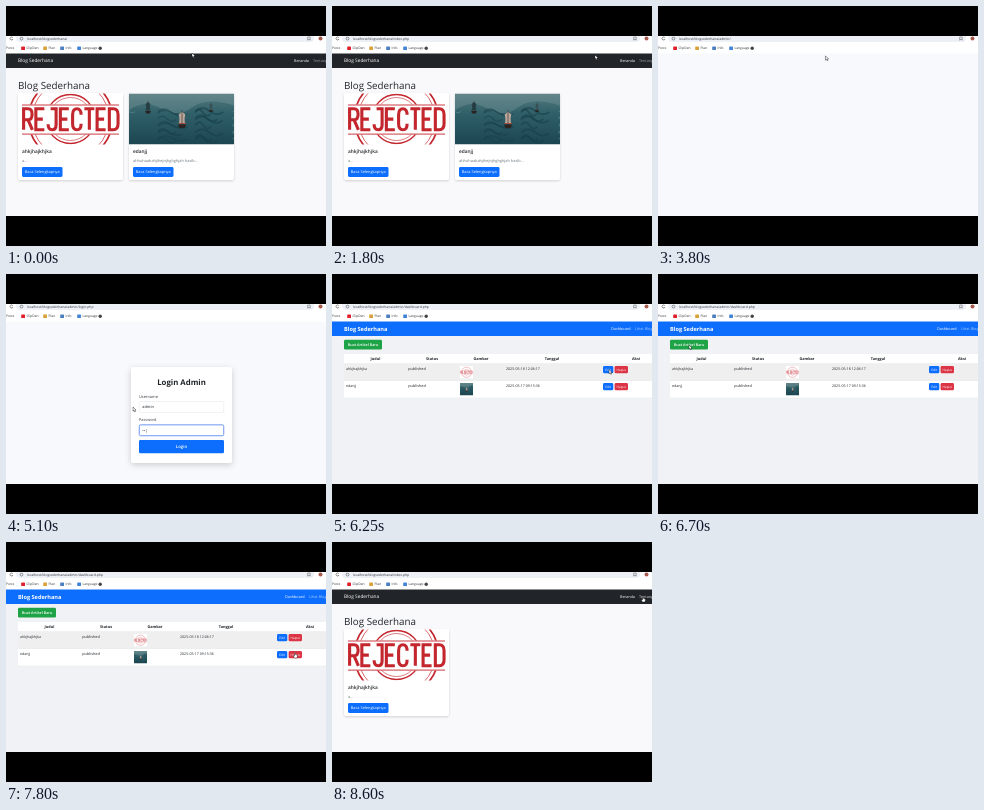
Write an HTML page that moves like this. It is 320 by 240 pixels and loops after 8650 ms.

```html
<!DOCTYPE html>
<html lang="id">
<head>
<meta charset="utf-8">
<title>Blog Sederhana</title>
<style>
html, body { margin: 0; width: 100%; height: 100%; overflow: hidden; background: #000; }
svg#stage { display: block; width: 100vw; height: 100vh; }
text { font-family: "Open Sans", "Noto Sans", sans-serif; text-rendering: geometricPrecision; white-space: pre; }
</style>
</head>
<body>
<svg id="stage" viewBox="0 0 320 240"></svg>
<script>
const LOOP = 8650;
const BLUE = '#0d6efd', DARK = '#212529', RED = '#c4262e';
const HOST = 'localhost/blogsederhana/';
const stage = document.getElementById('stage');

// y is the middle of the lower-case letters
const text = (x, y, s, size, fill = DARK, weight = 400, anchor = 'start', id = '') =>
  `<text ${id && `id="${id}"`} x="${x}" y="${y + size * 0.31}" font-size="${size}" fill="${fill}" font-weight="${weight}" text-anchor="${anchor}">${s}</text>`;
const rect = (x, y, w, h, fill, r = 0, more = '') =>
  `<rect x="${x}" y="${y}" width="${w}" height="${h}" rx="${r}" fill="${fill}" ${more}/>`;
const line = (d, stroke, width, more = '') =>
  `<path d="${d}" fill="none" stroke="${stroke}" stroke-width="${width}" ${more}/>`;
const group = (id, body, more = '') => `<g id="${id}" ${more}>${body}</g>`;
const place = (x, y, k = 1) => `matrix(${k} 0 0 ${k} ${x} ${y})`;
const button = (x, y, w, h, s, fill, size = 3.7, weight = 400) =>
  rect(x, y, w, h, fill, 1.4) + text(x + w / 2, y + h / 2, s, size, '#fff', weight, 'middle');
const field = (x, y, w, h, id = '') =>
  rect(x + .25, y + .25, w - .5, h - .5, '#fff', 1.4, `stroke="#dee2e6" stroke-width=".5" ${id && `id="${id}"`}`);
const picture = (id, x, y, w, h) => `<use href="#${id}" x="${x}" y="${y}" width="${w}" height="${h}"/>`;

function stamp() {
  const glyphs = {
    R: 'M0 21V0H4.5Q8.5 0 8.5 5.5T4.5 11H0M4.5 11L8.8 21',
    E: 'M8.5 0H0V21H8.5M0 10.3H7',
    J: 'M2.5 0H8V16Q8 21 4 21T0 15.5',
    C: 'M8.5 6Q8.5 0 4.3 0T0 6V15Q0 21 4.3 21T8.5 15',
    T: 'M-.5 0H9.5M4.5 0V21',
    D: 'M0 0H4Q8.7 0 8.7 6V15Q8.7 21 4 21H0Z'
  };
  const ring = (r, w) => `<circle cx="52.5" cy="52.5" r="${r}" fill="none" stroke="${RED}" stroke-width="${w}"/>`;
  const word = [...'REJECTED'].map((c, i) =>
    `<path transform="${place(5.6 + i * 12.25, 42.3)}" d="${glyphs[c]}"/>`).join('');
  return rect(0, 0, 105, 105, '#fff') + ring(42, 1.7) + ring(38.5, .7) + ring(24.5, 1.3) + ring(21.5, .6) +
    rect(0, 38, 105, 30, '#fff') + line('M4 38.5H101M4 67.6H101', RED, .9) +
    `<g fill="none" stroke="${RED}" stroke-width="3.1">${word}</g>`;
}

function sea() {
  let waves = '';
  for (let i = 0; i < 26; i++) {
    const x = (i * 37.3) % 112 - 8, y = 17 + (i * 13.7) % 34, w = 7 + (i * 5) % 9;
    waves += line(`M${x} ${y}q${w / 2} ${-4 - i % 3} ${w} 0t${w} 1`, i % 3 ? '#173f49' : '#6d9698', 1 + i % 3 * .4, 'opacity=".55"');
  }
  const ship = (x, y, k, sail) => `<g transform="${place(x, y, k)}">` +
    `<path d="M-5 6H5L3 10H-3Z" fill="#2b2322"/><path d="M-4 5Q-2 0-4-6L0-9 4-6Q2 0 4 5Z" fill="${sail}"/>` +
    line('M0-11V6', '#2d2524', .7) + '</g>';
  return rect(0, 0, 105, 51, 'url(#water)') +
    '<path d="M0 17Q15 5 32 15T63 14T105 12V0H0Z" fill="#7e9ea0" opacity=".35"/>' + waves +
    ship(19, 14, .6, '#26434a') + ship(53, 26, .85, '#b9a79b') + ship(82, 14, .45, '#3a5a60') +
    line('M50 30H57', '#a4493d', 1.2);
}

const defs = `<defs>
<linearGradient id="water" x2="0" y2="1"><stop stop-color="#55797d"/><stop offset=".4" stop-color="#2f5f68"/><stop offset="1" stop-color="#1c4651"/></linearGradient>
<filter id="soft" x="-20%" y="-20%" width="140%" height="140%"><feDropShadow dx="0" dy="1" stdDeviation="1.3" flood-opacity=".16"/></filter>
<filter id="deep" x="-20%" y="-20%" width="140%" height="140%"><feDropShadow dx="0" dy="2" stdDeviation="3" flood-opacity=".18"/></filter>
<clipPath id="screen"><rect y="30" width="320" height="180"/></clipPath>
<symbol id="stampPic" viewBox="0 0 105 105" preserveAspectRatio="xMidYMid slice">${stamp()}</symbol>
<symbol id="seaPic" viewBox="0 0 105 51" preserveAspectRatio="xMidYMid slice">${sea()}</symbol></defs>`;

function toolbar() {
  const marks = [[0, 'Posts', ''], [20.5, 'ClipDen', '#e0202b'], [42.5, 'Plan', '#d8a13a'],
    [59.5, 'Info', '#4c7fc0'], [76.5, 'Language', '#4285d8']];
  return rect(0, 30, 320, 17.5, '#fff') + rect(10, 26, 298, 10, '#edf0f7', 4) +
    line('M6.8 31.6A1.5 1.5 0 1 0 7 33', '#444', .6) +
    `<circle cx="15.5" cy="32.6" r="1.4" fill="none" stroke="#555" stroke-width=".6"/>` +
    text(21, 32.6, '', 3.4, '#333', 400, 'start', 'url') +
    line('M301.7 31V34.2L303 33.2 304.2 34.2V31Z', '#555', .5) +
    '<circle cx="314.5" cy="32.6" r="2" fill="#a75a4d"/>' +
    marks.map(([x, s, c]) => (c ? rect(x - 5.3, 40.4, 3.8, 3.6, c, .6) : '') + text(x, 42.2, s, 3.3, '#333')).join('') +
    '<circle cx="94.2" cy="42.2" r="1.7" fill="#444"/>';
}

const card = (x, pic, title, body) =>
  rect(x, 87, 105, 87, '#fff', 2, 'filter="url(#soft)"') + picture(pic, x, 87.5, 105, 51) +
  text(x + 4, 146, title, 4.8, DARK, 600) + text(x + 4, 154.3, body, 3.9, '#6c757d') +
  button(x + 4, 161, 40.5, 10, 'Baca Selengkapnya', BLUE, 3.9);

const home = rect(0, 47, 320, 163, '#f9f9fb') + rect(0, 47, 320, 15, DARK) +
  text(12, 54.8, 'Blog Sederhana', 4.8, '#fff') + text(288, 54.8, 'Beranda', 3.8, '#fff') +
  text(307, 54.8, 'Tentang', 3.8, '#999c9f', 400, 'start', 'about') +
  text(12, 80.4, 'Blog Sederhana', 9.8, DARK, 500) +
  card(12, 'stampPic', 'ahkjhajkhjka', 'a...') +
  group('second', card(123, 'seaPic', 'edanjj', 'ahhuhaahahjihejnjhghghjah hasib...'));

const login = group('loginCard', rect(125, 93, 101, 96, '#fff', 3, 'filter="url(#deep)"') +
  text(175.5, 108.3, 'Login Admin', 7.8, DARK, 700, 'middle') +
  text(133, 122.4, 'Username', 3.9, '#343a40') + field(133, 127.3, 85, 11.4, 'userBox') +
  text(136.3, 133, '', 3.9, DARK, 400, 'start', 'user') +
  text(133, 146, 'Password', 3.9, '#343a40') + field(133, 150.6, 85, 11.4, 'passBox') +
  text(136.3, 156.3, '', 3.9, DARK, 400, 'start', 'pass') +
  button(133, 166, 85, 13.3, 'Login', BLUE, 4.3, 600));

const row = (y, title, pic, date, fill) =>
  rect(12, y, 308, 17, fill) + line(`M12 ${y + 17}H320`, '#dee2e6', .4) +
  text(14, y + 5.2, title, 3.6) + text(76.3, y + 5.2, 'published', 3.8) +
  picture(pic, 128, y + 2, 13, 12.5) + text(174, y + 5.2, date, 3.6) +
  button(271, y + 2, 10.3, 7.3, 'Edit', BLUE, 3.2) + button(282.6, y + 2, 13.4, 7.3, 'Hapus', '#dc3545', 3.2);

const dashboard = rect(0, 47, 320, 163, '#f0f2f5') + rect(0, 47, 320, 15, BLUE) +
  text(12, 54.8, 'Blog Sederhana', 5.6, '#fff', 700) + text(279, 54.8, 'Dashboard', 3.8, '#fff') +
  text(303, 54.8, 'Lihat Blog', 3.8, '#a5c8fd') +
  button(12, 65.8, 38, 9.8, 'Buat Artikel Baru', '#1fa347', 3.7, 600) +
  rect(12, 80, 308, 10, '#fff') + line('M12 89.8H320', '#ccd0d4', .4) +
  [[43.5, 'Judul'], [100, 'Status'], [149, 'Gambar'], [220, 'Tanggal'], [304, 'Aksi']]
    .map(([x, s]) => text(x, 84.6, s, 3.8, DARK, 700, 'middle')).join('') +
  row(90, 'ahkjhajkhjka', 'stampPic', '2025-05-18 12:06:17', '#efeff0') +
  group('row2', row(107, 'edanjj', 'seaPic', '2025-05-17 09:15:36', '#fff'));

const label = (y, s) => text(79, y, s, 3.8, DARK, 600);
const modal = rect(75, 54, 201.5, 158, '#fff', 2) + rect(75, 54, 201.5, 15, '#343a40', 2) +
  rect(75, 65, 201.5, 4, '#343a40') + text(79, 61.5, 'Buat Artikel Baru', 4.7, '#fff', 600) +
  line('M269 59.8l3 3m0-3l-3 3', '#15181a', .7) +
  label(76.3, 'Judul') + field(79, 80.5, 193.5, 11) +
  label(98.2, 'Konten') + field(79, 102.3, 193.5, 41) +
  label(150.4, 'Status') + field(79, 154.7, 193.5, 11) + text(82, 160.2, 'Draft', 3.8) +
  line('M265.7 159.6l1.4 1.4 1.4-1.4', '#343a40', .6) +
  label(172, 'Gambar (opsional)') + field(79, 176.5, 193.5, 11) + rect(79.3, 176.8, 25.5, 10.4, '#e9ecef', 1.2) +
  text(82, 182, 'Choose File', 3.8) + text(108.5, 182, 'No file chosen', 3.8) +
  line('M75 194H276.5', '#dee2e6', .4) +
  button(235.5, 198.8, 15, 9.8, 'Batal', '#6c757d') + button(252.5, 198.8, 20, 9.8, 'Simpan', BLUE);

function suggestions() {
  const glass = y => `<circle cx="17.8" cy="${y - .4}" r="1.1" fill="none" stroke="#555" stroke-width=".5"/>` +
    line(`M18.6 ${y + .4}l1.2 1.2`, '#555', .5);
  const bold = s => `<tspan font-weight="700">${s}</tspan>`;
  const rows = [`<tspan class="typed"></tspan><tspan fill="#666"> - Fendle Search</tspan>`,
    `localhost/${bold('belajar')}/index.php`, `localhost/${bold('belajar routing')}`,
    `localhost/${bold('belajar php')}`, `localhost/${bold('index')}`];
  const blue = '#2450b8';
  return `<path d="M10 30H309.5V108.5Q309.5 112 306 112H13.5Q10 112 10 108.5Z" fill="#fff" filter="url(#deep)"/>` +
    rect(12, 38.2, 296, 9.8, '#e9eef8', 3) +
    [32.6, 43].map(y => `<circle cx="18" cy="${y}" r="1.6" fill="#555"/>`).join('') +
    text(25, 32.6, '', 3.4, '#333', 400, 'start', 'query') +
    text(25, 43.2, '<tspan class="typed"></tspan>', 3.45, blue, 600) +
    rect(16, 51.2, 4, 4, '#e8812c', .6) + text(25, 53.3, 'Blog Sederhana', 3.4, '#333') +
    text(49.8, 53.3, ' - ', 3.4, '#777') +
    text(53, 53.3, `<tspan class="typed" font-weight="600"></tspan><tspan id="rest" fill="#5a83d6"></tspan>`, 3.4, blue) +
    rows.map((s, i) => glass(63.4 + i * 10.15) + text(25, 63.4 + i * 10.15, s, 3.4, '#333')).join('');
}

const pointers = {
  arrow: '<path d="M0 0V4.2L1 3.3 1.7 4.9 2.4 4.6 1.8 3.1H3.1Z" fill="#fff" stroke="#000" stroke-width=".4"/>',
  beam: line('M-.8-2H.8M0-2V2M-.8 2H.8', '#444', .5),
  hand: '<path d="M-.5-.2Q0-.8.5-.2V1.6L2.4 2.1V3.6L1.8 5H-.6L-1.9 2.8-.5 2.9Z" fill="#fff" stroke="#000" stroke-width=".4"/>'
};

stage.innerHTML = defs + '<rect width="320" height="240"/>' + group('view',
  rect(0, 47, 320, 163, '#f8f9fc') + group('home', home) + login + group('dash', dashboard) +
  group('shade', rect(0, 47, 320, 163, '#000', 0, 'opacity=".5"')) + group('modal', modal) +
  group('bar', toolbar()) + group('drop', suggestions()) +
  group('pointer', Object.keys(pointers).map(k => group(k, pointers[k])).join('')),
  'clip-path="url(#screen)"');

const el = {};
stage.querySelectorAll('[id]').forEach(n => el[n.id] = n);
const typed = stage.querySelectorAll('.typed');

// time, x, y, pointer shape on arrival
const route = [
  [0, 186, 47, 'arrow'], [350, 311, 55, 'hand'], [550, 311, 55, 'hand'], [900, 291, 55, 'hand'],
  [1100, 291, 55, 'hand'], [1800, 263, 49, 'arrow'], [2000, 168, 32, 'beam'], [3600, 168, 32, 'beam'],
  [4350, 165, 133, 'beam'], [4500, 165, 133, 'beam'], [4700, 127, 133, 'beam'], [5450, 127, 133, 'beam'],
  [6150, 277, 95.5, 'hand'], [6300, 277, 95.5, 'hand'], [6620, 31, 71, 'hand'], [6750, 31, 71, 'hand'],
  [7050, 66, 77.5, 'arrow'], [7250, 66, 77.5, 'arrow'], [7600, 289, 111, 'hand'], [7800, 289, 111, 'hand'],
  [8100, 311, 55, 'hand'], [LOOP, 311, 55, 'hand']
];

const clamp = v => Math.max(0, Math.min(1, v));
const ease = v => v * v * (3 - 2 * v);
const within = (t, a, b) => t >= a && t < b;
const show = (node, on) => node.setAttribute('display', on ? 'inline' : 'none');
const typing = (s, t, start, step) => s.slice(0, Math.max(0, Math.floor((t - start) / step)));

function movePointer(t) {
  const i = route.findIndex((p, k) => k && t <= p[0]);
  const [t0, x0, y0, from] = route[i - 1], [t1, x1, y1, to] = route[i];
  const k = ease(clamp((t - t0) / (t1 - t0)));
  el.pointer.setAttribute('transform', place(x0 + (x1 - x0) * k, y0 + (y1 - y0) * k));
  const shape = k > .85 ? to : k < .1 ? from : 'arrow';
  Object.keys(pointers).forEach(n => show(el[n], n === shape));
}

function focus(box, on) {
  box.setAttribute('stroke', on ? '#5b8def' : '#dee2e6');
  box.setAttribute('stroke-width', on ? .9 : .5);
}

function draw(t) {
  const atEnd = t >= 8200;
  show(el.home, t < 3600 || atEnd);
  show(el.second, !atEnd);
  show(el.loginCard, within(t, 4150, 5450));
  show(el.dash, within(t, 5450, 8200));
  show(el.row2, t < 8000);
  el.about.setAttribute('fill', within(t, 330, 600) || atEnd ? '#d5d7d9' : '#999c9f');

  const page = t < 950 ? '' : t < 3500 || atEnd ? 'index.php' : t < 4150 ? 'admin/' :
    t < 5450 ? 'admin/login.php' : 'admin/dashboard.php';
  el.url.textContent = HOST + page;

  show(el.drop, within(t, 2250, 3500));
  const part = typing('admin/', t, 2350, 125);
  el.query.textContent = HOST + part + '|';
  typed.forEach(n => n.textContent = HOST + part);
  el.rest.textContent = 'admin/'.slice(part.length);

  const inUser = within(t, 4450, 5000), inPass = t >= 5000;
  el.user.textContent = typing('admin', t, 4820, 30) + (inUser ? '|' : '');
  el.pass.textContent = typing('•••••', t, 5000, 50) + (inPass ? '|' : '');
  focus(el.userBox, inUser);
  focus(el.passBox, inPass);

  const open = ease(clamp((t - 6750) / 200)) * (1 - ease(clamp((t - 7250) / 150)));
  el.shade.setAttribute('opacity', open);
  el.modal.setAttribute('opacity', open);
  el.modal.setAttribute('transform', place(0, -10 * (1 - open)));
  show(el.shade, open > 0);
  show(el.modal, open > 0);
  movePointer(t);
}

function tick() {
  draw(performance.now() % LOOP);
  requestAnimationFrame(tick);
}
tick();
</script>
</body>
</html>
```
